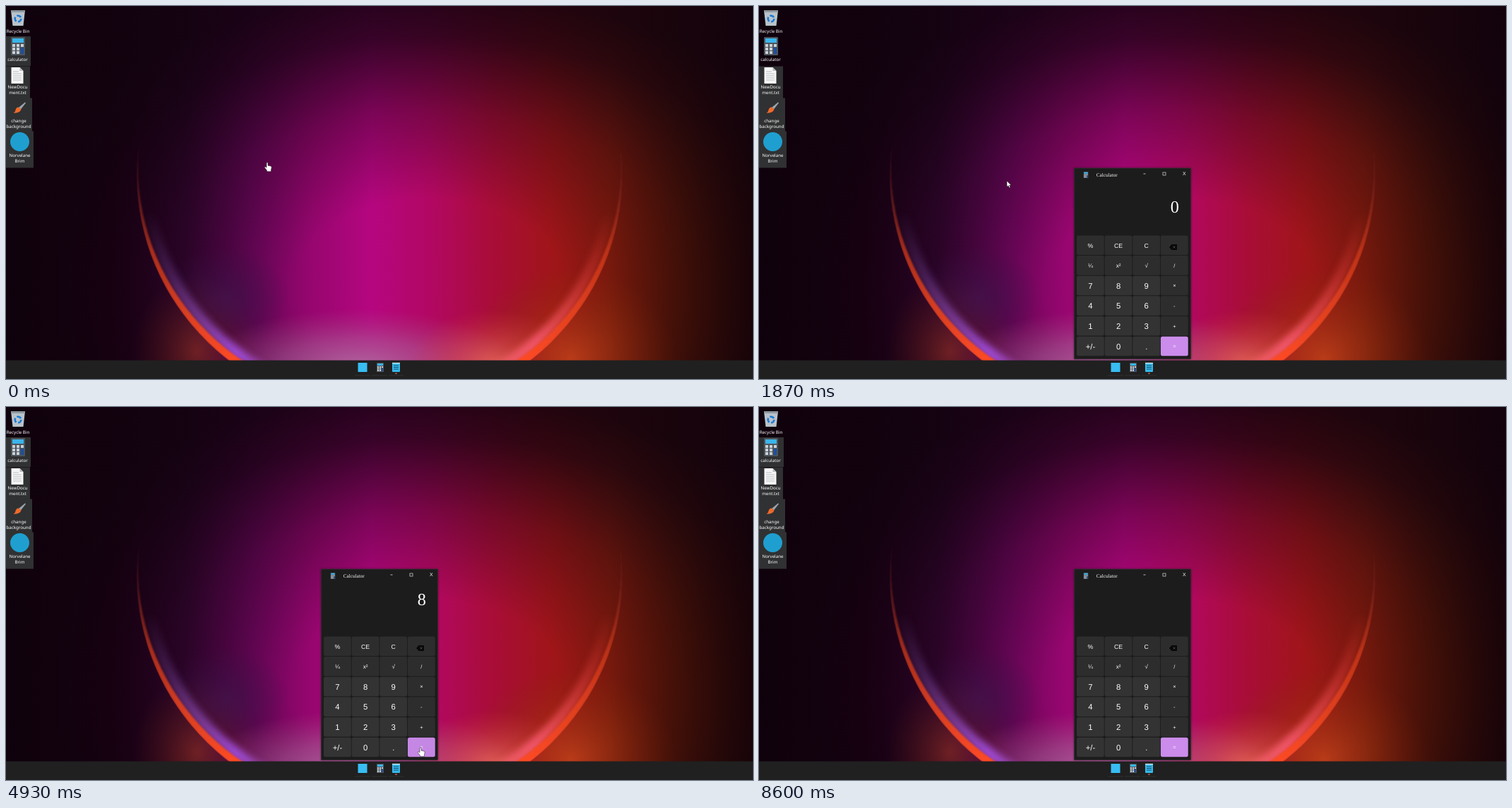
Write an HTML page that moves like this. It is 1058 px wide and 529 px high and loops after 8740 ms.

```html
<!DOCTYPE html>
<html lang="en">
<head>
<meta charset="utf-8">
<title>Desktop calculator</title>
<style>
  html, body { margin: 0; width: 100%; height: 100%; overflow: hidden; background: #0c0210; }
  svg { display: block; width: 100vw; height: 100vh; }
  text { fill: #fff; text-anchor: middle; text-rendering: geometricPrecision; }
  .label { font: 6.2px "Noto Sans", "Open Sans", sans-serif; }
  .tile { fill: #303132; }
  .serif { font-family: "Liberation Serif", serif; }
  .sans { font-family: "Liberation Sans", sans-serif; }
  #display { font-size: 24.3px; text-anchor: end; }
</style>
</head>
<body>
<svg viewBox="0 0 1058 529" preserveAspectRatio="none">
  <defs>
    <linearGradient id="spectrum">
      <stop offset="0" stop-color="#0d000b"/><stop offset=".14" stop-color="#1e0015"/><stop offset=".24" stop-color="#350532"/>
      <stop offset=".33" stop-color="#6a065a"/><stop offset=".41" stop-color="#97066f"/><stop offset=".49" stop-color="#b60680"/>
      <stop offset=".57" stop-color="#b20862"/><stop offset=".65" stop-color="#a90d38"/><stop offset=".73" stop-color="#a01519"/>
      <stop offset=".81" stop-color="#851c0d"/><stop offset=".9" stop-color="#561606"/><stop offset="1" stop-color="#240704"/>
    </linearGradient>
    <radialGradient id="dusk" gradientUnits="userSpaceOnUse" cx="0" cy="0" r="1" gradientTransform="translate(600 400) scale(640 420)">
      <stop offset=".3" stop-color="#10020d" stop-opacity="0"/><stop offset=".6" stop-color="#10020d" stop-opacity=".35"/>
      <stop offset=".85" stop-color="#10020d" stop-opacity=".76"/><stop offset="1" stop-color="#10020d" stop-opacity=".88"/>
    </radialGradient>
    <radialGradient id="haze"><stop offset="0" stop-color="#b07aa4" stop-opacity=".85"/><stop offset=".5" stop-color="#a8689a" stop-opacity=".5"/><stop offset="1" stop-color="#a05080" stop-opacity="0"/></radialGradient>
    <radialGradient id="coral"><stop offset="0" stop-color="#f0705c" stop-opacity=".8"/><stop offset="1" stop-color="#d03a40" stop-opacity="0"/></radialGradient>
    <radialGradient id="ember"><stop offset="0" stop-color="#c8481a" stop-opacity=".75"/><stop offset="1" stop-color="#802a08" stop-opacity="0"/></radialGradient>
    <radialGradient id="violet"><stop offset="0" stop-color="#40144c" stop-opacity=".7"/><stop offset="1" stop-color="#351040" stop-opacity="0"/></radialGradient>
    <linearGradient id="rim" gradientUnits="userSpaceOnUse" x1="0" y1="120" x2="0" y2="500">
      <stop offset="0" stop-color="#702038" stop-opacity="0"/><stop offset=".32" stop-color="#7e2628" stop-opacity=".4"/>
      <stop offset=".6" stop-color="#cc3818" stop-opacity=".8"/><stop offset="1" stop-color="#fb4a24"/>
    </linearGradient>
    <linearGradient id="inner" gradientUnits="userSpaceOnUse" x1="190" y1="0" x2="870" y2="0">
      <stop offset="0" stop-color="#5a3a70"/><stop offset=".2" stop-color="#a04cdc"/><stop offset=".35" stop-color="#a05090" stop-opacity="0"/>
      <stop offset=".7" stop-color="#ff6a70" stop-opacity=".2"/><stop offset=".82" stop-color="#f85a70"/><stop offset="1" stop-color="#d83020"/>
    </linearGradient>
    <linearGradient id="fade" gradientUnits="userSpaceOnUse" x1="0" y1="290" x2="0" y2="500"><stop offset="0" stop-color="#000"/><stop offset="1" stop-color="#fff"/></linearGradient>
    <mask id="lower" maskUnits="userSpaceOnUse" x="0" y="0" width="1058" height="529"><rect width="1058" height="529" fill="url(#fade)"/></mask>
    <clipPath id="orb"><ellipse cx="529" cy="240" rx="344" ry="335"/></clipPath>
    <filter id="soft"><feGaussianBlur stdDeviation="5"/></filter>
    <filter id="edge"><feGaussianBlur stdDeviation=".9"/></filter>
    <filter id="shadow" x="-10%" y="-10%" width="120%" height="120%"><feDropShadow dx="0" dy="0" stdDeviation="1.5" flood-opacity=".5"/></filter>

    <symbol id="calcIcon" viewBox="0 0 20 26">
      <rect width="20" height="26" rx="1" fill="#4d555c"/>
      <rect x="2" y="2" width="16" height="6" fill="#3ab5ea"/>
      <path d="M2 10h4v4h-4zM8 10h4v4h-4zM14 10h4v4h-4zM2 15h4v4h-4zM8 15h4v4h-4zM2 20h4v4h-4zM8 20h4v4h-4z" fill="#c9d0d6"/>
      <path d="M14 15h4v9h-4z" fill="#1d4f9c"/>
    </symbol>
  </defs>

  <g id="wallpaper">
    <rect width="1058" height="529" fill="url(#spectrum)"/>
    <rect width="1058" height="529" fill="url(#dusk)"/>
    <ellipse cx="800" cy="500" rx="150" ry="130" fill="url(#ember)"/>
    <ellipse cx="270" cy="490" rx="90" ry="110" fill="url(#ember)" opacity=".55"/>
    <g clip-path="url(#orb)">
      <ellipse cx="310" cy="415" rx="90" ry="75" fill="url(#violet)"/>
      <ellipse cx="500" cy="515" rx="230" ry="85" fill="url(#haze)"/>
      <ellipse cx="690" cy="510" rx="120" ry="80" fill="url(#coral)"/>
      <ellipse cx="529" cy="240" rx="329" ry="319" fill="none" stroke="url(#inner)" stroke-width="16" filter="url(#soft)" mask="url(#lower)"/>
      <path d="M185 240a344 335 0 1 0 688 0a344 335 0 1 0-688 0M187 228a342 334 0 1 0 684 0a342 334 0 1 0-684 0" fill="url(#rim)" fill-rule="evenodd" filter="url(#edge)"/>
    </g>
  </g>

  <g id="desktop">
    <path d="M7 6h20l-2.5 22h-15z" fill="#b9c3cb"/>
    <path d="M7 6h20l-1 3h-18z" fill="#8f989f"/>
    <circle cx="17" cy="18" r="4.3" fill="none" stroke="#1b7bd6" stroke-width="2.6" stroke-dasharray="6.5 2.5"/>
    <rect id="calcTile" class="tile" y="43" width="35" height="42"/>
    <path class="tile" d="M0 85.5h34v45h3v47h2v52h-39z"/>
    <use href="#calcIcon" x="7" y="44" width="20" height="26"/>
    <path d="M7.500 87h12l5 5v18h-17z" fill="#f6f6f6"/>
    <path d="M19.500 87v5h5z" fill="#b9bcc0"/>
    <path d="M10 93h8M10 96h12M10 99h12M10 102h12M10 105h12" stroke="#b4b8bc" stroke-width=".9"/>
    <path d="M27 136.500l1 1-7 9-3-2.500z" fill="#9aa3ab"/>
    <path d="M18 143.500l3.500 3q-2 6-11 5 3-1.500 3-4 1-4 4.500-4z" fill="#ee6a2a"/>
    <circle cx="19.500" cy="192.500" r="13.500" fill="#1f9fd0"/>
    <g id="labels"></g>
  </g>

  <g id="calculator" visibility="hidden">
    <rect x="446.500" y="230" width="165" height="270.500" fill="#1c1c1c" stroke="#303030" stroke-width=".7" filter="url(#shadow)"/>
    <use href="#calcIcon" x="459.500" y="235" width="7" height="9"/>
    <text class="serif" x="492.700" y="242" font-size="7.2">Calculator</text>
    <path d="M544.500 238h3" stroke="#ddd" stroke-width=".8"/>
    <rect x="572" y="236" width="4" height="4" fill="none" stroke="#ddd" stroke-width=".7"/>
    <text class="sans" x="602.300" y="240.200" font-size="7">X</text>
    <text id="display" class="serif" x="595"></text>
    <g id="keys"></g>
    <path d="M581 342l3.500-4h7.500v8h-7.500z" fill="#080808"/>
    <path d="M586.500 340.500l3 3m0-3l-3 3" stroke="#555" stroke-width=".8"/>
  </g>

  <g id="taskbar">
    <rect y="502.500" width="1058" height="26.500" fill="#202020"/>
    <rect x="498.500" y="506" width="13" height="13" fill="#38bdf2"/>
    <use href="#calcIcon" x="525" y="506" width="10" height="13"/>
    <rect x="547" y="506" width="11" height="13" rx="1" fill="#36b8ea"/>
    <path d="M547 506.500h11" stroke="#d5eef8" stroke-width="1.300"/>
    <path d="M549 510h7M549 512.500h7M549 515h7" stroke="#14506e" stroke-width="1"/>
    <rect x="551" y="520.500" width="3" height="1.200" rx=".6" fill="#e0705c"/>
    <path d="M494 524h22m2 0h22m2 0h21" stroke="#303030" stroke-width="1"/>
  </g>

  <g id="cursor">
    <path id="arrow" d="M0 0v8.500l2-1.800 1.600 3.300 1.500-.7-1.500-3.100h2.700z" fill="#fff" stroke="#000" stroke-width=".5"/>
    <path id="hand" d="M-1 1q0-1.200 1-1.200t1 1.200v3.200l4 .9q1.300.4 1.200 2l-.8 3.600v2h-5.900v-1.500l-3-3.700q-.6-1 .3-1.500.8-.4 2.200 1.200z" fill="#fff" stroke="#111" stroke-width=".5"/>
  </g>
</svg>
<script>
  const LOOP = 8740;
  const $ = id => document.getElementById(id);

  function add(parent, tag, attrs, text = '') {
    const el = document.createElementNS('http://www.w3.org/2000/svg', tag);
    for (const name in attrs) el.setAttribute(name, attrs[name]);
    el.textContent = text;
    return parent.appendChild(el);
  }

  [['Recycle Bin', 17, 38], ['calculator', 16.5, 78], ['NewDocu', 16.5, 117], ['ment.txt', 16.5, 125],
   ['change', 18, 164.5], ['background', 18, 172.5], ['Norvelane', 19.5, 213.5], ['Brim', 19.5, 221.5]]
    .forEach(([text, x, y]) => add($('labels'), 'text', { class: 'label', x, y }, text));

  // Keypad
  const keys = {};
  const rows = ['% CE C back', '¼ x² √ /', '7 8 9 ×', '4 5 6 -', '1 2 3 +', '+/- 0 . ='];
  rows.forEach((row, r) => row.split(' ').forEach((name, c) => {
    const x = 450 + c * 39.65, y = 325.4 + r * 28.65;
    const digit = r > 1 && c < 3;
    const fill = name === '=' ? '#cb8ceb' : digit ? '#333333' : '#2d2d2d';
    const box = add($('keys'), 'rect', { x, y, width: 38.8, height: 27.6, rx: 2.5, fill });
    const size = digit ? 11.3 : r === 0 ? 8.7 : c === 3 ? 7.6 : 8.2;
    if (name !== 'back')
      add($('keys'), 'text', { class: 'sans', x: x + 19.4, y: y + 14 + size * .36, 'font-size': size }, name);
    keys[name] = { box, x, y, fill };
  }));

  // Pointer path: time, x, y
  const path = [
    [70, 370, 222], [930, 36, 72], [1070, 31, 65], [1330, 31, 65], [1870, 351, 248], [2200, 471, 340],
    [2530, 517, 393], [2670, 517, 393], [2870, 543, 400], [3130, 587, 402], [3400, 587, 402],
    [3730, 510, 398], [3930, 504, 396], [4070, 504, 396], [4930, 588, 484], [5330, 588, 484],
    [6070, 589, 346.5], [7330, 589, 346.5], [7470, 1040, 500]
  ];
  const eased = new Set([70, 4070, 5330]);

  function pointer(t) {
    if (t <= path[0][0]) return path[0].slice(1);
    const i = path.findIndex(p => p[0] > t);
    if (i < 0) return path[path.length - 1].slice(1);
    const [t0, x0, y0] = path[i - 1], [t1, x1, y1] = path[i];
    let k = (t - t0) / (t1 - t0);
    if (eased.has(t0)) k = (1 - Math.cos(Math.PI * k)) / 2;
    return [x0 + (x1 - x0) * k, y0 + (y1 - y0) * k];
  }

  // Display: start time, text, baseline
  const readouts = [[0, '0', 293], [2670, '8', 281], [3400, '', 281], [4070, '8', 281],
    [5070, '64', 293], [6400, '6', 281], [6800, '', 281]];

  const show = (id, on) => $(id).setAttribute('visibility', on ? 'visible' : 'hidden');

  function draw(t) {
    const [x, y] = pointer(t);
    const open = t >= 1330;
    $('calculator').setAttribute('visibility', open ? 'visible' : 'hidden');
    show('calcTile', t < 1330 || t >= 2670);

    const [, text, base] = readouts.filter(r => r[0] <= t).pop();
    $('display').textContent = text;
    $('display').setAttribute('y', base);

    let over = '';
    for (const name in keys) {
      const { box, x: kx, y: ky, fill } = keys[name];
      const inside = open && x >= kx && x < kx + 39.65 && y >= ky && y < ky + 28.65;
      if (inside) over = name;
      const lit = name === 'back' ? t >= 7330 && t < 8600
        : name === '×' ? t >= 3130 && t < 3930 : inside;
      box.setAttribute('fill', !lit ? fill : name === '=' ? '#c587e4' : '#303030');
    }

    const hand = t < 70 || (over && over !== 'back');
    const visible = t < 7470;
    show('hand', visible && hand);
    show('arrow', visible && !hand);
    $('cursor').setAttribute('transform', `translate(${x} ${y})`);
  }

  // The picture advances 15 steps per second.
  const started = performance.now();
  function tick() {
    const t = (performance.now() - started) % LOOP;
    draw(Math.round(Math.floor(t * .015 + .001) * 20 / 3) * 10);
    requestAnimationFrame(tick);
  }
  tick();
</script>
</body>
</html>
```
